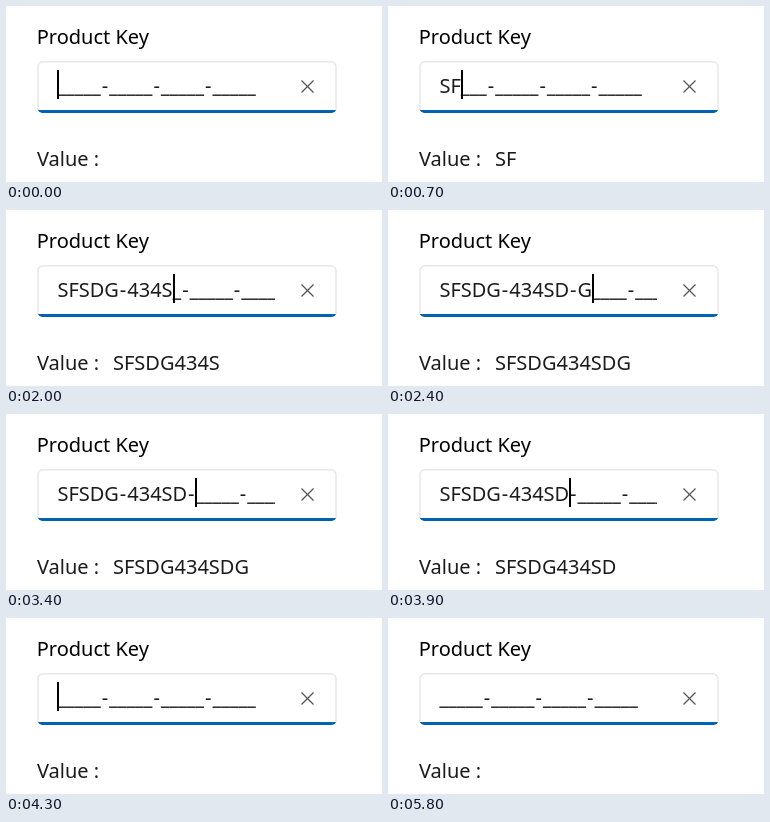
These frames come from a looping animation (376 px wide and 176 px high, 6 s). An HTML page with a canvas:

```html
<!DOCTYPE html>
<html lang="en">
<head>
<meta charset="utf-8">
<title>Product Key</title>
<style>
html, body { margin: 0; width: 100%; height: 100%; overflow: hidden; background: #fff; }
canvas { display: block; width: 376px; height: 176px; }
</style>
</head>
<body>
<canvas id="stage"></canvas>
<script>
const W = 376, H = 176, LOOP = 6000;
const TICK = 100;       // screen refresh
const LAG = 30;         // the label trails the field
const CARET_OFF = 5800;
const FONT = '20px "Noto Sans", "Open Sans", sans-serif';
const INK = '#1b1b1b';
const MASK = '_____-_____-_____-_____';
const TYPED = 'SFSDG-434SD-G';

// Bursts of key presses: first press, number of presses, gap
const TYPING = [
  { at: 280, n: 2, gap: 300 },
  { at: 780, n: 3, gap: 100 },
  { at: 1280, n: 4, gap: 100 },
  { at: 2080, n: 2, gap: 200 }
];
const ERASING = [
  { at: 3380, n: 1, gap: 30 },
  { at: 3880, n: 12, gap: 30 }
];

const canvas = document.getElementById('stage');
const ctx = canvas.getContext('2d');
const dpr = window.devicePixelRatio || 1;
canvas.width = W * dpr;
canvas.height = H * dpr;
ctx.scale(dpr, dpr);
ctx.font = FONT;

function presses(bursts, t) {
  return bursts.reduce((sum, { at, n, gap }) =>
    sum + Math.max(0, Math.min(n, Math.floor((t - at) / gap) + 1)), 0);
}

function entered(t) {
  const letters = presses(TYPING, t);
  const hyphens = Math.max(0, Math.floor((letters - 1) / 5));
  return TYPED.slice(0, letters + hyphens - presses(ERASING, t));
}

function text(str, x, y, color) {
  ctx.fillStyle = color;
  ctx.fillText(str, x, y);
}

function line(x1, y1, x2, y2) {
  ctx.beginPath();
  ctx.moveTo(x1, y1);
  ctx.lineTo(x2, y2);
  ctx.stroke();
}

function clipped(shape, paint) {
  ctx.save();
  ctx.beginPath();
  shape();
  ctx.clip();
  paint();
  ctx.restore();
}

function drawBox() {
  clipped(() => ctx.roundRect(31.5, 55, 299, 52, 5), () => {
    ctx.fillStyle = '#0063b1';
    ctx.fillRect(31, 104, 300, 3);
  });
  clipped(() => ctx.rect(30, 54, 302, 50), () => {
    ctx.strokeStyle = '#e8e8e8';
    ctx.lineWidth = 1.5;
    ctx.beginPath();
    ctx.roundRect(32, 55.75, 298, 54, 5);
    ctx.stroke();
  });
  ctx.strokeStyle = '#555';
  ctx.lineWidth = 1.2;
  line(295.5, 74.5, 307.5, 86.5);
  line(307.5, 74.5, 295.5, 86.5);
}

function advance(ch) {
  if (ch === '_') return 8.67;
  if (ch === '-') return 8.35;
  return ctx.measureText(ch).width;
}

function drawField(str, caret) {
  let x = 51.4, caretX = x;
  ctx.fillStyle = INK;
  [...str + MASK.slice(str.length)].forEach((ch, i) => {
    const w = advance(ch);
    if (i === str.length) caretX = x;
    if (ch === '_') ctx.fillRect(x, 88.5, w, 1.4);
    else ctx.fillText(ch, x + (w - ctx.measureText(ch).width) / 2, 87);
    x += w;
  });
  if (caret) {
    ctx.fillStyle = '#000';
    ctx.fillRect(Math.round(caretX), 64, 2, 29);
  }
}

function draw(time) {
  const t = Math.floor(time / TICK) * TICK;
  ctx.fillStyle = '#fff';
  ctx.fillRect(0, 0, W, H);
  text('Product Key', 30.7, 37.6, '#000');
  drawBox();
  clipped(() => ctx.rect(50, 60, 219, 40),
    () => drawField(entered(t), t < CARET_OFF));
  text('Value :', 31, 160, INK);
  text(entered(t - LAG).replaceAll('-', ''), 107, 160, INK);
}

const start = performance.now();
function tick() {
  draw((performance.now() - start) % LOOP);
  requestAnimationFrame(tick);
}
tick();
</script>
</body>
</html>
```
